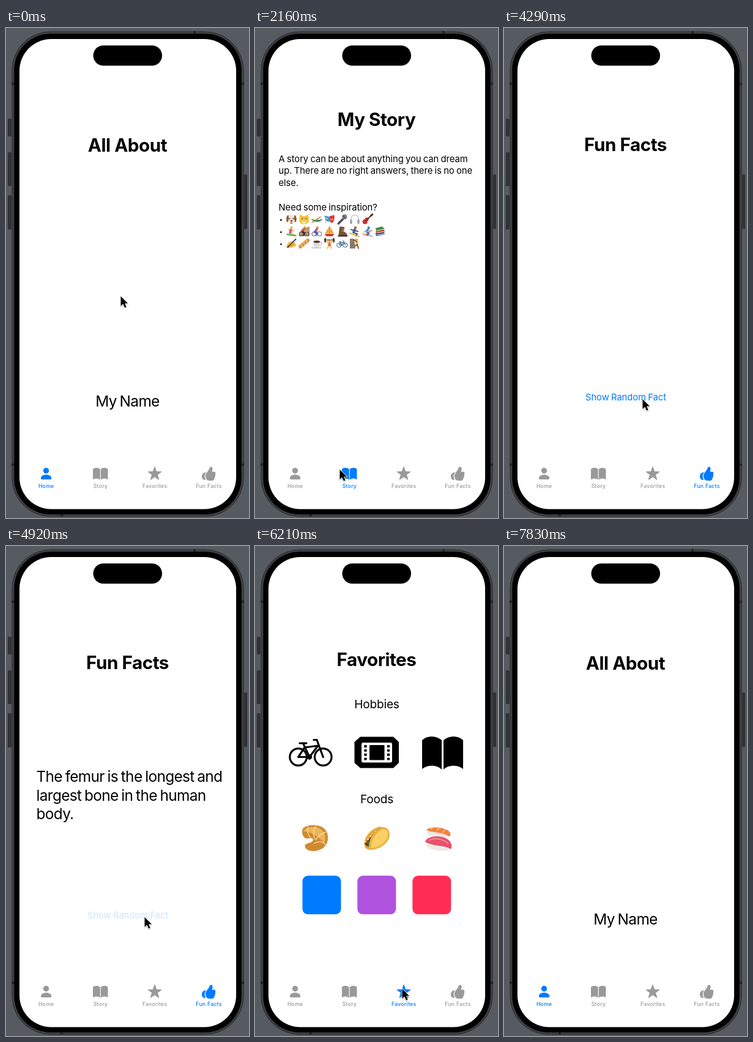
These frames come from a looping animation (397 px wide and 800 px high, 7860 ms). An HTML page:

```html
<!DOCTYPE html>
<html lang="en">
<head>
<meta charset="utf-8">
<title>All About</title>
<style>
  html, body { margin: 0; width: 100%; height: 100%; overflow: hidden; background: #565b61; }
  svg { display: block; width: 397px; height: 800px; font-family: Inter, "Open Sans", sans-serif; }
  .title { font-size: 29.6px; font-weight: 700; letter-spacing: -.015em; text-anchor: middle; }
  .big { font-size: 24.4px; letter-spacing: -.027em; word-spacing: -.06em; }
  .head { font-size: 19.1px; letter-spacing: -.01em; }
  .body { font-size: 14.8px; letter-spacing: -.005em; word-spacing: -.05em; }
  .tab { font-size: 8.7px; font-weight: 500; letter-spacing: .03em; }
  .mid, .tab { text-anchor: middle; }
</style>
</head>
<body>
<svg viewBox="0 0 397 800">
  <defs>
    <path id="book" d="M0 6C8-2 23-2 32 6V54C24 46 9 46 0 53ZM35 6C44-2 59-2 67 6V53C58 46 43 46 35 54Z"/>
    <g id="bike" fill="none" stroke-linecap="round" stroke-linejoin="round">
      <circle cx="15.7" cy="30.5" r="13.8"/><circle cx="56.3" cy="30.5" r="13.8"/>
      <path d="M15.7 30.5L26 15L48 12L34 30.5H15.7M24 9L34 30.5M18 8H29M41 2.500H46L56.3 30.5"/>
      <circle cx="34" cy="30.5" r="2.6"/>
    </g>
    <path id="thumb" d="M-5 3C-5-1-1-4 1-8C2-11.5 4-12 5.500-11C7.500-9.500 6-5 5.500-3.500H9C11.500-3.500 12-.8 10.600.2C11.800 1.800 11.200 3.600 10.200 4.200C10.800 6 9.800 7.300 9 7.700C9.200 9.800 7.500 11 5.500 11H1.500C-3 11-5 7.500-5 3ZM-5.500-2.500C-8.500-2.500-11 .5-11 4.200S-8.500 10-5.800 9.800H-4.300C-7.200 6.500-7 1-4-2.500Z"/>
  </defs>

  <g id="phone">
    <rect width="397" height="800" fill="#565b61"/>
    <g fill="#303235">
      <rect x="3" y="148" width="6" height="29" rx="1.5"/>
      <rect x="3" y="203" width="6" height="55" rx="1.5"/>
      <rect x="3" y="273" width="6" height="56" rx="1.5"/>
      <rect x="389" y="239" width="5" height="89" rx="1.5"/>
    </g>
    <rect x="10" y="6" width="378" height="791.5" rx="63" fill="#35373a" stroke="#2a2c2e"/>
    <rect x="11.5" y="7.5" width="375" height="788.5" rx="61.5" fill="none" stroke="#48494b"/>
    <path d="M9 91H14M384 91H389M9 713H14M384 713H389M308 5V10M91 793V798" stroke="#222426" stroke-width="4"/>
    <rect x="13.5" y="9.5" width="371" height="784.5" rx="59" fill="#000"/>
    <rect x="22" y="18" width="354" height="767.5" rx="52" fill="#fff"/>
    <rect x="142.5" y="28.5" width="112.5" height="33" rx="16.5"/>
  </g>

  <g class="page">
    <text class="title" x="198.5" y="201.5">All About</text>
    <text class="big mid" x="198.5" y="618">My Name</text>
  </g>

  <g class="page">
    <text class="title" x="198.5" y="160">My Story</text>
    <g id="story" class="body"></g>
    <g id="emoji"></g>
  </g>

  <g class="page">
    <text class="title" x="198.5" y="195.5">Favorites</text>
    <text class="head mid" x="199" y="265">Hobbies</text>
    <use href="#bike" x="55" y="314" stroke="#000" stroke-width="3.2"/>
    <path d="M172 312H226L234.500 320V354L226 362H172L163 354V320Z" stroke="#000" stroke-linejoin="round"/>
    <rect x="174" y="321" width="50" height="32.5" rx="3" fill="#fff"/>
    <rect x="187" y="325" width="24.5" height="24.5" rx="1"/>
    <path d="M180.500 325V351M218 325V351" stroke="#000" stroke-width="4.2" stroke-dasharray="3.9 3"/>
    <use href="#book" x="273" y="311"/>
    <text class="head mid" x="199" y="419.5">Foods</text>

    <path d="M77 467C76 459 86 455 98 456C112 456 120 466 119 477C119 490 108 498 95 498C86 498 80 493 82 488C85 484 92 486 95 480C94 475 88 479 82 477C79 475 77 471 77 467Z" fill="#cf8a30"/>
    <path d="M79 466C84 458 96 457 105 461C114 465 117 475 113 485C108 478 92 465 79 466Z" fill="#ecb55a"/>
    <path d="M87 458C84 465 87 472 91 477M100 457C94 464 95 472 98 479M116 467C108 469 103 474 99 480M116 488C109 481 102 482 96 486" fill="none" stroke="#fbe0a0" stroke-width="1.3"/>

    <path d="M179 490C176 478 188 461 205 458L212 461L190 496C184 496 180 494 179 490Z" fill="#e3a93a"/>
    <path d="M182 489L205 463" stroke="#54702b" stroke-width="8"/>
    <path d="M181 488L206 463" stroke="#6b3d22" stroke-width="6" stroke-dasharray="4 3"/>
    <path d="M180 484L201 461" stroke="#e9dfc0" stroke-width="2.5" stroke-dasharray="2 4"/>
    <path d="M182 483L198 465" stroke="#cf3d2c" stroke-width="2" stroke-dasharray="2 6"/>
    <path d="M187 496C184 484 191 465 208 459C218 458 222 468 219 477C215 488 200 497 187 496Z" fill="#e9b23f"/>
    <path d="M190 493C188 483 197 467 210 462C217 463 219 470 216 477C211 487 200 493 190 493Z" fill="#f8d065"/>

    <path d="M281 467C288 462 309 464 319 470C319 475 309 476 299 475C288 475 280 472 281 467Z" fill="#ece8e4"/>
    <path d="M280 464C285 458 305 458 316 465C321 469 320 474 317 474C306 467 290 468 280 464Z" fill="#f5803e"/>
    <path d="M287 463L291 459M297 465L301 460M306 468L311 463" stroke="#ffc197" stroke-width="1.5"/>
    <path d="M279 486C288 480 314 484 321 492C318 499 301 499 292 496C283 494 278 491 279 486Z" fill="#eeebe8"/>
    <path d="M278 483C281 473 300 472 312 477C321 482 323 490 320 495C310 488 292 491 278 483Z" fill="#e8506b"/>
    <path d="M284 481C292 475 307 478 316 486" fill="none" stroke="#ff98a6" stroke-width="1.5"/>

    <rect x="77.5" y="538.3" width="63" height="63" rx="9" fill="#007aff"/>
    <rect x="167.3" y="538.3" width="63" height="63" rx="9" fill="#af52de"/>
    <rect x="257.3" y="538.3" width="63" height="63" rx="9" fill="#ff2d55"/>
  </g>

  <g class="page">
    <text class="title" x="198.5" y="200.5">Fun Facts</text>
    <g class="fact big">
      <text x="49.5" y="385.2">The femur is the longest and</text>
      <text x="49.5" y="415.8">largest bone in the human</text>
      <text x="49.5" y="446.4">body.</text>
    </g>
    <g class="fact big">
      <text x="52.5" y="400.5">Ice is 9 percent less dense</text>
      <text x="52.5" y="431.1">than liquid water.</text>
    </g>
    <text id="button" class="body mid" x="199" y="607.5" fill="#007aff">Show Random Fact</text>
  </g>

  <g class="tabItem">
    <circle cx="65.5" cy="722.7" r="4.7"/>
    <path d="M57 735C57 731.5 61 729.3 65.5 729.3S74.2 731.5 74.2 735C74.2 736.5 73.5 737 72 737H59C57.6 737 57 736.5 57 735Z"/>
    <text class="tab" x="65.7" y="751">Home</text>
  </g>
  <g class="tabItem">
    <use href="#book" transform="translate(142 718) scale(.365)"/>
    <text class="tab" x="154.4" y="751">Story</text>
  </g>
  <g class="tabItem">
    <path id="star" stroke-linejoin="round"/>
    <text class="tab" x="243.2" y="751">Favorites</text>
  </g>
  <g class="tabItem">
    <use href="#thumb" x="331" y="728"/>
    <text class="tab" x="331.5" y="751">Fun Facts</text>
  </g>

  <g id="cursor" style="filter: drop-shadow(0 1px 1px rgba(0,0,0,.3))">
    <path d="M.5 1V17L4.300 13.500L7 19.500L9.600 18.400L7 12.500H12Z" stroke="#fff" stroke-width="1.4" paint-order="stroke"/>
  </g>
</svg>

<script>
const $ = id => document.getElementById(id);
const all = cls => [...document.querySelectorAll("." + cls)];
const LOOP = 7860, STEP = 30;

// small drawing helpers; emoji live in a box of about -9..9
const dot = (x, y, r, fill) => `<circle cx="${x}" cy="${y}" r="${r}" fill="${fill}"/>`;
const fill = (d, color) => `<path d="${d}" fill="${color}"/>`;
const line = (d, color, w = 1.5) =>
  `<path d="${d}" fill="none" stroke="${color}" stroke-width="${w}" stroke-linecap="round"/>`;
const face = (eye, nose) => dot(-3, -1, 1, eye) + dot(3, -1, 1, eye) + dot(0, 2.5, 1.3, nose);
const wheels = color => line("M-8 4a3.5 3.5 0 1 0 7 0a3.5 3.5 0 1 0 -7 0M1 4a3.5 3.5 0 1 0 7 0a3.5 3.5 0 1 0 -7 0", color, 1);
const rider = (shirt, pants) =>
  dot(1, -6, 2.3, "#e0a52f") + line("M0 -3L-3 1", shirt, 4) + line("M0 -2L5 0", "#f2c08a") + line("M-2 1L1 3L-1 6", pants, 2.5);

const emoji = [
  [
    dot(0, 0, 7.5, "#f0e6d8") + fill("M-5 -7C-9 -6 -9 3 -7 5C-4 3 -4 -3 -5 -7ZM5 -7C9 -6 9 3 7 5C4 3 4 -3 5 -7Z", "#8a5a33") + face("#222", "#222") + dot(0, 6, 1.8, "#e86a75"),
    fill("M-7 -8L-1 -5H1L7 -8L8 2C7 10 -7 10 -8 2Z", "#f9c338") + dot(0, 4, 3, "#fff0c2") + face("#3d5a22", "#e27d7d"),
    fill("M-9 -1C-4 2 4 2 9 -1C8 6 -7 6 -9 -1Z", "#2f8b50") + line("M-7 5L6 -4", "#b5793a"),
    fill("M-8 -6L0 -4V4C-5 5 -8 0 -8 -6Z", "#3a9be0") + fill("M0 -5L8 -7C9 1 7 6 3 6C0 4 -1 0 0 -5Z", "#dc4034") + line("M2 1Q4 -1 6 0M-6 -2L-3 -1", "#fff", 1) + line("M-7 -4L-6 6", "#e5b739", 1),
    line("M-6 7L3 -2", "#4a4d52", 3.5) + dot(4, -4, 4, "#777b80") + line("M1 -6L6 -1", "#34373b", 1),
    line("M-6 3V-1C-6 -9 6 -9 6 -1V3", "#c6cbd0", 1.7) + line("M-6 2V6M6 2V6", "#9da3aa", 3.5),
    dot(-4, 4, 4, "#d6302f") + dot(-1, 0, 3, "#d6302f") + line("M-3 3L6 -6", "#6e3a24", 2) + line("M6 -6L8 -8", "#3c2a22", 3)
  ], [
    dot(0, -6, 2.2, "#e6b23c") + line("M0 -3L-2 2L3 5M-5 -3L4 -1", "#f3bd72", 2) + line("M-1 -2L-2 2", "#e74c8c", 4) + line("M-7 5L7 7", "#58b83c", 2.5),
    fill("M-9 8L-4 -4L9 -8V8Z", "#b69b7c") + wheels("#333") + rider("#c33b36", "#333"),
    wheels("#555") + rider("#8d45b5", "#3a62b8"),
    line("M0 -8V5", "#8b5b32", 1) + fill("M-1 -7L-7 3H-1ZM1 -8L7 3H1Z", "#f1a22c") + fill("M-8 4H8L5 8H-5Z", "#cf3b30"),
    fill("M-4 -8L4 -7L3 0L8 4V7H-6L-5 0Z", "#7b5132") + line("M-6 7.5H8", "#33251c", 2) + line("M1 -4L4 -3M0 -1L3 0", "#dcc092", 1),
    dot(1, -6, 2.4, "#d95b35") + line("M0 -3L-2 1", "#3579c8", 4) + line("M-2 2L4 4L2 7M-6 -3L5 0", "#37485f", 2) + line("M-8 3L7 8", "#e6a330", 2),
    dot(2, -6, 2.2, "#3181cf") + line("M1 -3L-2 0L2 3L0 6", "#2c82c9", 3) + line("M-6 1L7 -1", "#e2a96c") + line("M-8 4L8 8M-5 7L7 -2", "#d34a3c", 1),
    fill("M-8 3L6 1L8 5L-6 8Z", "#2b62ac") + fill("M-7 -1L6 -3L8 1L-6 4Z", "#c4382f") + fill("M-8 -5L3 -8L8 -4L-5 0Z", "#398e45") + line("M-5 6L7 4M-5 2L7 0M-5 -1L7 -4", "#f4ead2", 1)
  ], [
    fill("M-8 4C-5 -4 -1 -5 3 -2L8 1C8 5 1 7 -8 7Z", "#f5bd36") + line("M-6 6L7 -7", "#33363b", 2) + line("M-2 3H4M-1 0H4", "#d18d22", 1),
    line("M-6 5L6 -5", "#d69643", 6) + line("M-5 2L-3 5M-1 -2L1 2M3 -5L5 -2", "#f5d491", 1.3),
    fill("M-6 -3H5C5 4 3 6 -1 6S-6 3 -6 -3Z", "#dadde0") + line("M5 -2C9 -3 9 3 4 3", "#c3c8cc") + `<ellipse cy="-3" rx="5.5" ry="2" fill="#593520"/>` + line("M-8 7H7", "#bfc5ca", 1.6),
    dot(0, -4, 2.4, "#e9b04a") + line("M0 0V3", "#d13f39", 4) + line("M-3 8L-2 4H2L3 8M-5 -6L-2 0H2L5 -6", "#e9b04a", 1.6) + line("M-8 -6H8", "#555", 1.2) + line("M-7 -8V-3M7 -8V-3", "#333", 2.5),
    `<use href="#bike" transform="translate(-9 -5) scale(.25)" stroke="#41749a" stroke-width="4.5"/>`,
    fill("M-8 -8H-1L1 8H-8Z", "#8c7868") + dot(3, -6, 2.2, "#dda33a") + line("M3 -3L4 1", "#e6b531", 4) + line("M3 -3L-1 -6M4 2L0 4M4 2L6 8", "#6f5136", 1.8)
  ]
];

$("emoji").innerHTML = emoji.map((row, r) => dot(42.5, 313.5 + r * 19.8, 1.4, "#000") +
  row.map((art, i) => `<g transform="translate(${59.5 + i * 20.7} ${312.3 + r * 19.8})">${art}</g>`).join("")).join("");

$("story").innerHTML = ["A story can be about anything you can dream", "up. There are no right answers, there is no one", "else.", "", "Need some inspiration?"]
  .map((s, i) => `<text x="38.5" y="${218.5 + i * 19.8}">${s}</text>`).join("");

$("star").setAttribute("d", "M" + Array.from({ length: 10 }, (_, i) => {
  const r = i % 2 ? 4.7 : 11.6, a = i * Math.PI / 5;
  return `${(243 + r * Math.sin(a)).toFixed(2)} ${(728 - r * Math.cos(a)).toFixed(2)}`;
}).join("L") + "Z");

// [start, end, x, y, optional bend x, bend y]
const moves = [
  [0, 0, 187, 437],
  [1080, 1590, 138, 720, 80, 690],
  [2160, 2520, 240, 722],
  [2670, 3060, 346, 722],
  [3840, 4260, 226, 605],
  [5790, 6150, 240, 722],
  [6270, 6540, 150, 722],
  [6690, 7020, 77.5, 718.5],
  [7350, 7500, 77.5, 802]
];
const pages = [[0, 0], [2160, 1], [2670, 2], [3240, 3], [6180, 2], [6600, 1], [7140, 0]];
const facts = [[0, -1], [4440, 0], [5010, 1]];
const presses = [[4350, 4440], [4920, 5010], [5520, 5610]];
const FADE = 390;

const pick = (table, t) => table.filter(row => row[0] <= t).pop();
const ease = p => p * p * (3 - 2 * p);

function pointer(t) {
  const i = moves.indexOf(pick(moves, t));
  const [a, b, x, y, bx, by] = moves[i];
  if (t >= b) return [x, y];
  const [, , x0, y0] = moves[i - 1];
  const p = ease((t - a) / (b - a));
  const mix = (from, to, bend = (from + to) / 2) =>
    (1 - p) ** 2 * from + 2 * p * (1 - p) * bend + p * p * to;
  return [mix(x0, x, bx), mix(y0, y, by)];
}

function buttonAlpha(t) {
  const press = pick(presses, t);
  if (!press) return 1;
  const p = Math.min(1, Math.max(0, (t - press[1]) / FADE));
  return .2 + .8 * ease(p);
}

const pageEls = all("page"), tabEls = all("tabItem"), factEls = all("fact");
const show = (els, n) => els.forEach((el, i) => el.style.display = i === n ? "" : "none");

function draw(now) {
  const t = Math.floor((now % LOOP) / STEP) * STEP;
  const page = pick(pages, t)[1];
  show(pageEls, page);
  show(factEls, pick(facts, t)[1]);
  tabEls.forEach((el, i) => el.setAttribute("fill", i === page ? "#007aff" : "#999"));
  $("star").setAttribute("stroke", page === 2 ? "#007aff" : "#999");
  $("button").setAttribute("opacity", buttonAlpha(t));
  $("cursor").setAttribute("transform", `translate(${pointer(t)})`);
}

const start = performance.now();
function tick() {
  draw(performance.now() - start);
  requestAnimationFrame(tick);
}
tick();
</script>
</body>
</html>
```
